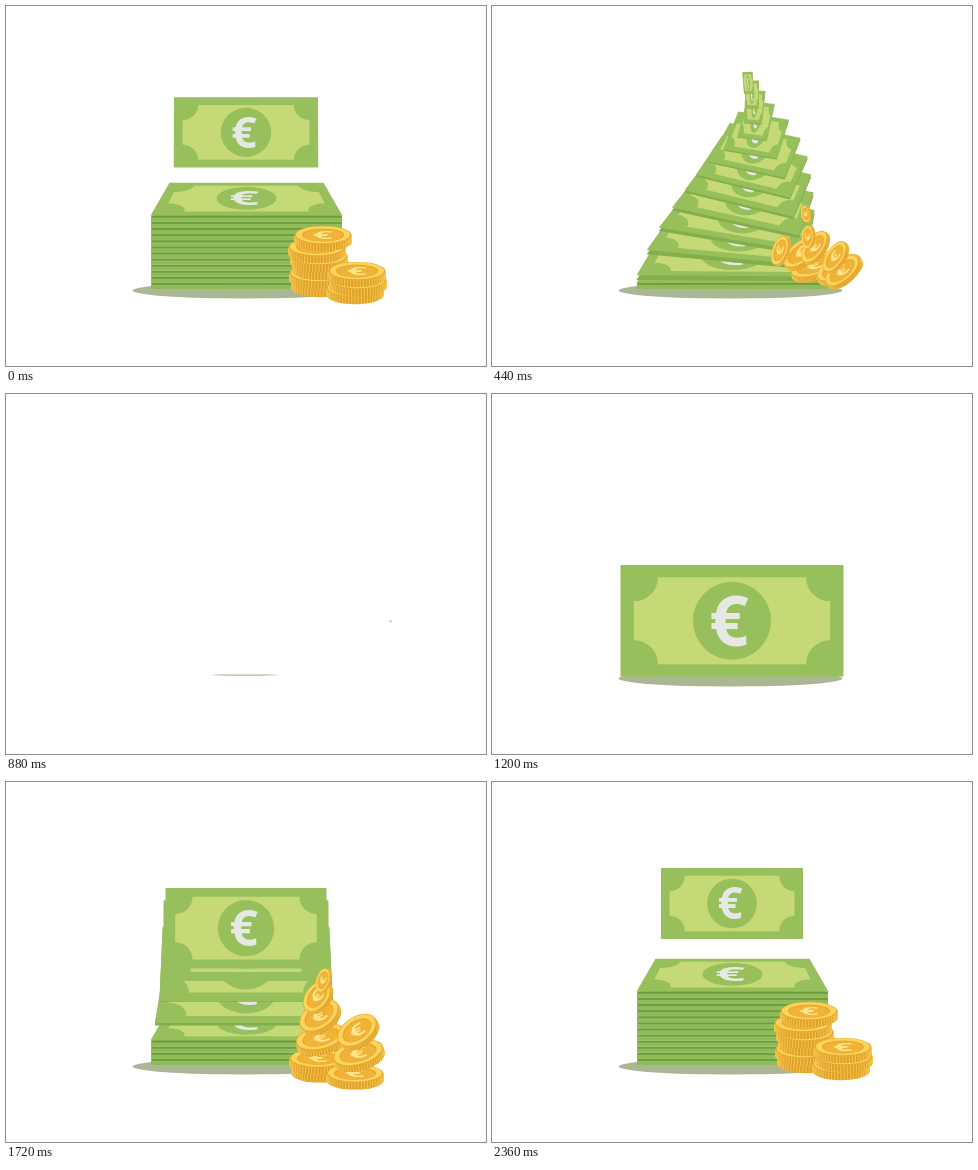
Write an HTML page with a canvas that moves like this. It is 480x360 px and loops after 2.44 s.

```html
<!DOCTYPE html>
<html>
<head>
<meta charset="utf-8">
<style>
  html, body { margin: 0; width: 100%; height: 100%; overflow: hidden; background: #fff; }
  canvas { display: block; }
</style>
</head>
<body>
<canvas id="stage" width="480" height="360"></canvas>
<script>
const ctx = document.getElementById('stage').getContext('2d');
const LOOP = 2440, STEP = 40, LAST = 59;
const GROUND = 283, LAYER = 6.1, LAYERS = 12;
const GREEN = '#97c05c', LIME = '#c5d976', EDGE = '#84ae4c', SEAM = '#6c9c3f', PALE = '#e6e8e4';

const clamp = x => Math.max(0, Math.min(1, x));
const mix = (a, b, p) => a + (b - a) * p;
const span = (t, from, to) => clamp((t - from) / (to - from));

function fillEllipse(x, y, rx, ry, color) {
  ctx.fillStyle = color;
  ctx.beginPath();
  ctx.ellipse(x, y, rx, ry, 0, 0, 7);
  ctx.fill();
}

// Points of an arc in note units, where a note is 1 x 1 and twice as wide as high.
function arc(x, y, r, from, to, n = 8) {
  return Array.from({ length: n + 1 }, (_, i) => {
    const a = mix(from, to, i / n) * Math.PI / 2;
    return [x + r * Math.cos(a), y + 2 * r * Math.sin(a)];
  });
}
const OUTLINE = [[-.5, -.5], [.5, -.5], [.5, .5], [-.5, .5]];
const PANEL = [
  ...arc(-.44, -.39, .108, 1, 0), ...arc(.44, -.39, .108, 2, 1),
  ...arc(.44, .39, .108, 3, 2), ...arc(-.44, .39, .108, 4, 3)
];
const DISC = arc(0, 0, .175, 0, 4, 32);

// A pose has a centre, the two edge vectors and a perspective taper k.
function drawNote({ x, y, ux, uy = 0, vx = 0, vy, k = 0 }) {
  const shape = (points, color, drop = 0) => {
    ctx.beginPath();
    for (const [a, b] of points) {
      const d = 1 - k * b;
      ctx.lineTo(x + (a * ux + b * vx) / d, y + drop + (a * uy + b * vy) / d);
    }
    ctx.closePath();
    ctx.fillStyle = color;
    ctx.fill();
  };
  if (k > .01) shape(OUTLINE, EDGE, 22 * k);
  shape(OUTLINE, GREEN);
  shape(PANEL, LIME);
  shape(DISC, GREEN);
  ctx.save();
  ctx.transform(ux / 100, uy / 100, vx / 50, vy / 50, x, y);
  ctx.font = 'bold 31px "Open Sans", sans-serif';
  ctx.textAlign = 'center';
  ctx.fillStyle = PALE;
  ctx.fillText('€', -1.4, 11.2);
  ctx.restore();
}

const flatNote = level => ({ x: 240.5, y: GROUND - LAYER * level - 18.3, ux: 171, vy: 32.6, k: .22 });

// The camera pulls back while the pile is rebuilt.
const zoom = t => t < 1200 ? 1 : Math.pow(1 - span(t, 1200, 2360), 2.44);

function hoverNote(t) {
  const width = 142 + 81 * zoom(t);
  return { x: 240, y: 86 + 85 * zoom(t) + width / 4, ux: width, vy: width / 2, k: 0 };
}

function fallingNote(from, level, p) {
  const to = flatNote(level), e = Math.pow(p, 1.6);
  return {
    x: 240, y: mix(from.y, to.y, e), ux: mix(from.ux, to.ux, e),
    vy: mix(from.vy, to.vy, Math.pow(e, 1.5)), k: to.k * Math.pow(e, 1.6)
  };
}

// Each note lifts, leans and turns edge-on as it is drawn up to one point.
function risingNote(level, p) {
  const start = flatNote(level);
  const size = 171 * Math.pow(1 - p, 1.2);
  const lean = .48 * Math.sin(1.4 * Math.PI * p);
  const flip = Math.max(.35, Math.cos(5 * Math.max(0, p - .35)));
  const tilt = mix(.7, .3, level / LAYERS);
  return {
    x: 240 + 25 * Math.sin(Math.PI * p), y: mix(start.y, 45, p),
    ux: size * Math.cos(lean) * flip, uy: tilt * size * Math.sin(lean) * flip,
    vx: -.47 * size * Math.sin(lean), vy: .5 * size * (.38 + 1.45 * p) * Math.cos(lean),
    k: .22 * Math.pow(1 - p, 2)
  };
}

function drawPile(n) {
  if (n > 0) drawNote(flatNote(n));
  for (let i = 1; i <= n; i++) {
    const y = GROUND - LAYER * i;
    ctx.fillStyle = '#8fbc56';
    ctx.fillRect(145, y, 191, LAYER);
    ctx.fillStyle = SEAM;
    ctx.fillRect(146, y, 190, 1.9);
  }
}

function drawNotes(t) {
  if (t < 880) {
    const launch = level => 130 + 28 * (LAYERS + 1 - level);
    let resting = 0;
    while (resting < LAYERS && t < launch(resting + 1)) resting++;
    drawPile(resting);
    for (let level = resting + 1; level <= LAYERS + 1; level++) {
      const p = (t - launch(level)) / 400;
      if (p >= 0 && p < 1) drawNote(risingNote(level, p));
    }
    if (t < launch(LAYERS + 1)) drawNote(fallingNote(hoverNote(2360), LAYERS + 1, span(t, -35, 140)));
  } else if (t < 1200) {
    const p = span(t, 900, 1120), end = hoverNote(1200);
    if (p) drawNote({ x: 240, y: mix(50, end.y, p), ux: end.ux * p, vy: end.vy * p });
  } else {
    const land = n => 1500 + 53 * n;
    const resting = Math.max(0, Math.min(LAYERS, Math.floor((t - 1500) / 53)));
    drawPile(resting);
    for (let n = resting + 1; n <= LAYERS; n++) {
      const start = land(n) - 200;
      if (t > start) drawNote(fallingNote(hoverNote(start), n, (t - start) / 200));
    }
    drawNote(hoverNote(t));
  }
}

// Resting place, scatter point, leaving time and return time; lowest coin first.
const pileOf = (homes, scatter, leave, back, top) => homes.map(([x, y], i) => ({
  x, y, top, spin: 1.3 + i * .25, to: scatter[i],
  leave: leave + 60 * (homes.length - 1 - i), back: back + 80 * i
}));
const coins = [
  ...pileOf([[314, 275], [312, 267], [315, 258], [313, 250], [311, 241], [317, 229]],
    [[345, 254], [306, 250], [329, 252], [271, 263], [318, 245], [312, 215]], 80, 1220, 185),
  ...pileOf([[349, 282], [352, 274], [351, 265]],
    [[342, 258], [348, 284], [336, 264]], 240, 1300, 200)
];

function drawCoin(x, y, r, ratio, angle, thick) {
  if (r < .5) return;
  const ry = r * ratio;
  ctx.save();
  ctx.translate(x, y);
  ctx.rotate(angle);
  fillEllipse(0, thick, r, ry, '#dfa02a');
  ctx.fillRect(-r, 0, 2 * r, thick);
  ctx.strokeStyle = '#f6c650';
  ctx.lineWidth = r * .035;
  ctx.beginPath();
  for (let i = 1; i < 28; i++) {
    const a = Math.PI * i / 28, px = r * Math.cos(a), py = ry * Math.sin(a);
    ctx.moveTo(px, py);
    ctx.lineTo(px, py + thick);
  }
  ctx.stroke();
  fillEllipse(0, 0, r, ry, '#e9ab32');
  fillEllipse(0, -.3, r * .95, ry * .93, '#fbd45c');
  fillEllipse(0, 0, r * .74, ry * .72, '#e9a92e');
  fillEllipse(0, ry * .05, r * .68, ry * .65, '#f0b338');
  ctx.scale(r / 28, ry / 28);
  ctx.font = 'bold 34px "Open Sans", sans-serif';
  ctx.textAlign = 'center';
  ctx.fillStyle = '#fde58c';
  ctx.fillText('€', 0, 12);
  ctx.restore();
}

function drawCoins(t) {
  for (const c of coins) {
    if (t < 1200) {
      const age = Math.max(0, t - c.leave), q = age / (600 - c.leave);
      const [tx, ty] = c.to;
      const hop = 14 * Math.sin(Math.PI * Math.min(q, 1));
      const r = 28.5 * Math.max(0, 1 - age / 520);
      drawCoin(mix(c.x, tx, q), mix(c.y, ty, q) - hop, r,
        .32 + .18 * Math.min(1, q * 2), -c.spin * q, r * mix(.25, .1, clamp(q)));
    } else {
      const p = span(t, c.back, c.back + 400), r = 28.5 * Math.pow(p, .6);
      drawCoin(c.x, mix(c.top, c.y + 40 * zoom(t), p), r,
        .32 + .33 * Math.sin(Math.PI * p), -1.7 * (1 - p), r * mix(.1, .25, p));
    }
  }
}

function drawShadow(t) {
  const rx = t < 1000
    ? 112 - 42 * span(t, 440, 600) - 40 * span(t, 600, 900)
    : mix(30, 112, span(t, 1000, 1120));
  fillEllipse(238.5, mix(279.7, 284.5, rx / 112), rx, 8 * (rx / 112) ** 2, '#abb692');
}

function render(now) {
  const t = Math.min(LAST, Math.floor(now % LOOP / STEP)) * STEP;
  ctx.fillStyle = '#fff';
  ctx.fillRect(0, 0, 480, 360);
  drawShadow(t);
  drawNotes(t);
  drawCoins(t);
}

let begin;
function tick(now) {
  begin ??= now;
  render(now - begin);
  requestAnimationFrame(tick);
}
render(0);
requestAnimationFrame(tick);
</script>
</body>
</html>
```
